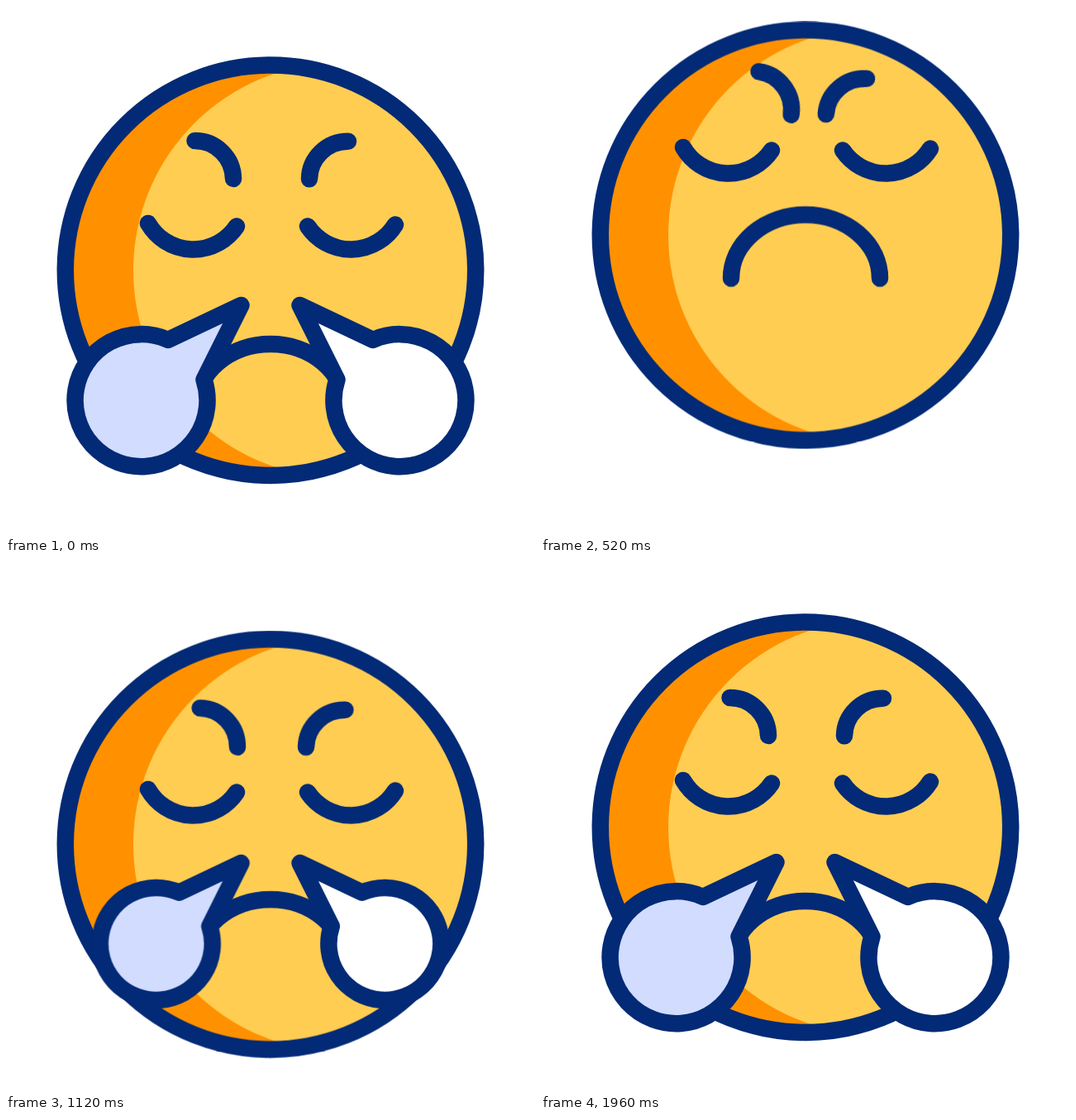
Animation, 640 px wide and 640 px high, one loop 2000 ms. Source, as an HTML page:

```html
<!DOCTYPE html>
<html lang="en">
<head>
<meta charset="utf-8">
<title>Huffing face</title>
<style>
  html, body { margin: 0; width: 100%; height: 100%; overflow: hidden; background: #fff; }
  svg { display: block; width: 640px; height: 640px; }

  .line { fill: none; stroke: #032a76; stroke-width: 20.5; stroke-linecap: round; stroke-linejoin: round; }

  .bob, .lift, .tilt, .puff {
    animation-duration: 2s;
    animation-iteration-count: infinite;
    animation-timing-function: ease-in-out;
  }
  .bob { animation-name: bob; }
  .lift { animation-name: lift; }
  .tilt { animation-name: tilt; }
  .puff { animation-name: puff, fade; vector-effect: non-scaling-stroke; }

  /* whole head: up, down, back to rest */
  @keyframes bob {
    0%, 98%, 100% { transform: translateY(0); }
    22% { transform: translateY(-44px); }
    60% { transform: translateY(22px); }
  }
  /* features slide up the head by --y */
  @keyframes lift {
    0%, 64.5%, 100% { transform: translateY(0); }
    35% { transform: translateY(var(--y)); }
  }
  /* brows pull inwards */
  @keyframes tilt {
    0%, 64.5%, 100% { transform: translateX(0) rotate(0deg); }
    30.5%, 35% { transform: translateX(var(--x)) rotate(var(--r)); }
  }
  /* puffs drift off, then regrow from the nostrils */
  @keyframes puff {
    0%, 64.5%, 100% { transform: translate(0, 0) scale(1); }
    22% { transform: translate(var(--x), var(--y)) scale(1); animation-timing-function: step-end; }
    35% { transform: translate(0, -115.4px) scale(.12); }
  }
  @keyframes fade {
    0%, 10% { opacity: 1; }
    22% { opacity: 0; animation-timing-function: step-end; }
    35%, 100% { opacity: 1; }
  }
</style>
</head>
<body>
<svg viewBox="0 0 640 640">
  <defs>
    <clipPath id="head"><circle cx="320" cy="319.7" r="248"/></clipPath>
  </defs>
  <g class="bob">
    <g clip-path="url(#head)">
      <circle cx="320" cy="319.7" r="248" fill="#ff9100"/>
      <circle cx="405" cy="319.7" r="251" fill="#ffcd52"/>
    </g>
    <circle class="line" cx="320" cy="319.7" r="248.2"/>

    <g class="lift" style="--y:-57.2px">
      <path class="line" d="M172 263A63 63 0 0 0 279 266.5M365 266.5A63 63 0 0 0 471 264.5"/>
    </g>

    <g class="lift" style="--y:-44px">
      <path class="line tilt" style="--x:32.7px;--r:8.9deg;transform-origin:251.5px 186px"
            d="M228.5 163A46.5 46.5 0 0 1 275 209"/>
    </g>
    <g class="lift" style="--y:-40px">
      <path class="line tilt" style="--x:-22px;--r:3.1deg;transform-origin:390.5px 186.5px"
            d="M414 163.7A46.5 46.5 0 0 0 367 209.3"/>
    </g>

    <g class="lift" style="--y:-131.8px">
      <path class="line" d="M230 486A90 77 0 0 1 410 486"/>
    </g>

    <path class="line puff" style="--x:-50.5px;--y:103.5px;fill:#d1dcfe;transform-origin:284.5px 362px"
          d="M196 404A80 80 0 1 0 239.5 452L284.5 362Z"/>
    <path class="line puff" style="--x:50.5px;--y:110.5px;fill:#fff;transform-origin:355.5px 362px"
          d="M444 404A80 80 0 1 1 400.5 452L355.5 362Z"/>
  </g>
</svg>
</body>
</html>
```
